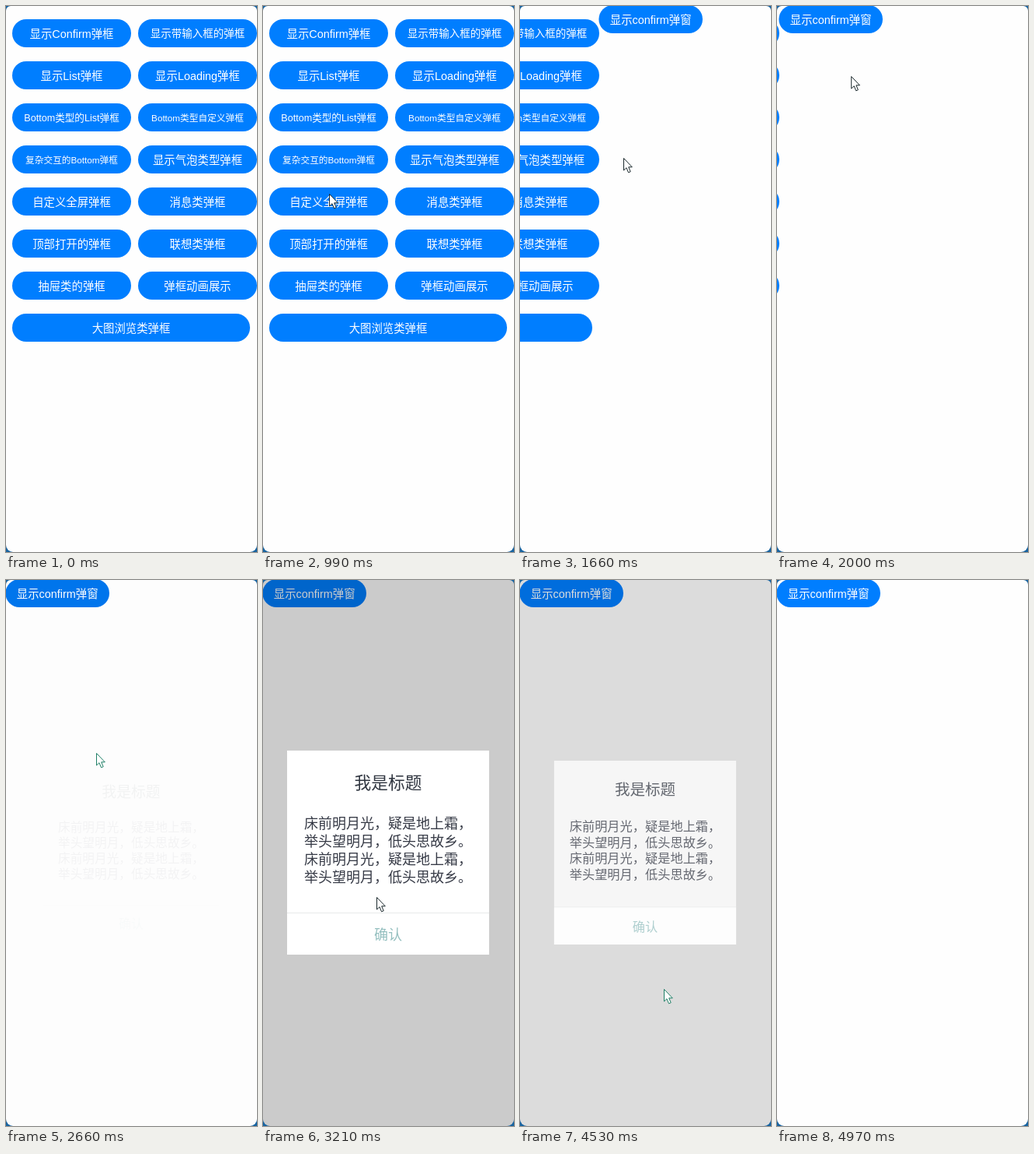
An HTML page with a canvas for the animation above (5.63 s loop, 323x701 px).

```html
<!DOCTYPE html>
<html lang="zh-CN">
<head>
<meta charset="utf-8">
<title>弹框演示</title>
<style>
html, body { margin: 0; width: 100%; height: 100%; overflow: hidden; background: #1763a0; }
canvas { display: block; width: 323px; height: 701px; }
</style>
</head>
<body>
<canvas id="stage"></canvas>
<script>
const W = 323, H = 701, LOOP = 5630, TICK = 110.4;
const FONT = '"Liberation Sans", Arial, "Noto Sans CJK SC", "Noto Sans CJK", sans-serif';
const BLUE = '#007eff', PAPER = '#fefefe', EDGE = '#1763a0';

// Moments of the story, in ticks
const OPEN_PAGE = 14, TAP = 22, SHOW = 23.1, SHOWN = 27, CONFIRM = 39, HIDE = 40, HIDDEN = 44;

const MENU = [
  '显示Confirm弹框', '显示带输入框的弹框', '显示List弹框', '显示Loading弹框',
  'Bottom类型的List弹框', 'Bottom类型自定义弹框', '复杂交互的Bottom弹框', '显示气泡类型弹框',
  '自定义全屏弹框', '消息类弹框', '顶部打开的弹框', '联想类弹框',
  '抽屉类的弹框', '弹框动画展示', '大图浏览类弹框'
];
const POEM = ['床前明月光，疑是地上霜，', '举头望明月，低头思故乡。'];

// Where the hand turns or rests: [tick, x, y]
const STOPS = [
  [2, 167, 175], [5, 92, 31], [7, 94, 19], [9, 85, 241], [11, 85, 241],
  [15, 133, 195], [20, 70, 20], [TAP, 70, 20], [24, 116, 222],
  [28, 131, 301], [29, 146, 407], [34, 181, 503], [CONFIRM, 160, 452], [41, 185, 525]
];

const canvas = document.getElementById('stage');
const ctx = canvas.getContext('2d');
const dpr = window.devicePixelRatio || 1;
canvas.width = Math.round(W * dpr);
canvas.height = Math.round(H * dpr);

const mix = (a, b, p) => a + (b - a) * p;
const progress = (a, b, k) => Math.min(1, Math.max(0, (k - a) / (b - a)));
const easeInOut = p => p < 0.5 ? 4 * p ** 3 : 1 - 4 * (1 - p) ** 3;

function pointerAt(k) {
  const i = STOPS.findIndex(stop => stop[0] > k);
  if (i < 0) return STOPS[STOPS.length - 1].slice(1);
  const [ka, xa, ya] = STOPS[i - 1], [kb, xb, yb] = STOPS[i];
  const p = progress(ka, kb, k);
  return [mix(xa, xb, p), mix(ya, yb, p)];
}

function label(text, x, y, size, color, align = 'center') {
  ctx.font = `${size}px ${FONT}`;
  ctx.textAlign = align;
  ctx.fillStyle = color;
  ctx.fillText(text, x, y + size * 0.37);
}

// Long labels step down in size until they fit the padding
function fitSize(text, room) {
  let size = 14.4;
  do {
    ctx.font = `${size}px ${FONT}`;
    if (ctx.measureText(text).width <= room) break;
    size -= 0.9;
  } while (size > 9);
  return size;
}

function pill(x, y, w, text, shade = 0) {
  ctx.beginPath();
  ctx.roundRect(x, y, w, 36, 18);
  ctx.fillStyle = BLUE;
  ctx.fill();
  ctx.fillStyle = `rgba(0,0,0,${shade})`;
  ctx.fill();
  label(text, x + w / 2, y + 18.5, fitSize(text, w - 28), '#fff');
}

function drawMenu(x) {
  MENU.forEach((text, i) => {
    const wide = i === MENU.length - 1;
    pill(x + 8 + (i % 2) * 162, 17 + (i >> 1) * 54, wide ? 306 : 153, text);
  });
}

function drawDialog(alpha, pressed) {
  ctx.fillStyle = `rgba(0,0,0,${0.2 * alpha ** 1.4})`;
  ctx.fillRect(0, 0, W, H);
  ctx.save();
  const zoom = mix(0.87, 1, alpha ** 5);
  ctx.globalAlpha = alpha;
  ctx.translate(161, 350);
  ctx.scale(zoom, zoom);
  ctx.translate(-161, -350);
  ctx.fillStyle = '#fff';
  ctx.fillRect(31, 219, 260, 262);
  ctx.fillStyle = pressed ? '#f1f1f1' : '#fff';
  ctx.fillRect(31, 428, 260, 53);
  ctx.fillStyle = '#e8eaea';
  ctx.fillRect(31, 427, 260, 1);
  label('我是标题', 161, 259.8, 21.7, '#303640');
  for (let i = 0; i < 4; i++) label(POEM[i % 2], 53, 312.2 + i * 22.9, 18, '#363a46', 'left');
  label('确认', 161, 455.3, 18, '#94bfbf');
  ctx.restore();
}

function drawPointer([x, y], color) {
  ctx.save();
  ctx.translate(x + 0.5, y + 0.5);
  ctx.fillStyle = '#fff';
  ctx.strokeStyle = color;
  const arrow = new Path2D('M0 0V15.5L3.5 12.2L6 18.3L8.7 17.2L6.2 11.3H10.8Z');
  ctx.fill(arrow);
  ctx.stroke(arrow);
  ctx.restore();
}

function draw(t) {
  const k = Math.floor((t + (t < 900 ? 22 : 4)) / TICK);
  const slide = Math.floor(W * 0.317 ** Math.max(0, k - OPEN_PAGE));
  const alpha = easeInOut(progress(SHOW, SHOWN, k)) * (1 - progress(HIDE, HIDDEN, k));
  const shade = k < TAP ? 0 : 0.2 * 0.6 ** (k - TAP);
  const fading = alpha > 0 && alpha < 1;

  ctx.setTransform(dpr, 0, 0, dpr, 0, 0);
  ctx.fillStyle = EDGE;
  ctx.fillRect(0, 0, W, H);
  ctx.save();
  ctx.beginPath();
  ctx.roundRect(0, 0, W, H, [6, 6, 9, 9]);
  ctx.clip();
  ctx.fillStyle = PAPER;
  ctx.fillRect(0, 0, W, H);

  if (slide > 0) drawMenu(slide - W);
  if (slide < W) pill(slide - 0.6, -1, 133.6, '显示confirm弹窗', shade);
  if (alpha > 0) drawDialog(alpha, k >= CONFIRM && k <= HIDE);
  if (k >= STOPS[0][0] && k < HIDDEN) drawPointer(pointerAt(k), fading ? '#1f7f66' : '#1a282c');
  ctx.restore();
}

const start = performance.now();
function frame() {
  draw((performance.now() - start) % LOOP);
  requestAnimationFrame(frame);
}
frame();
</script>
</body>
</html>
```
